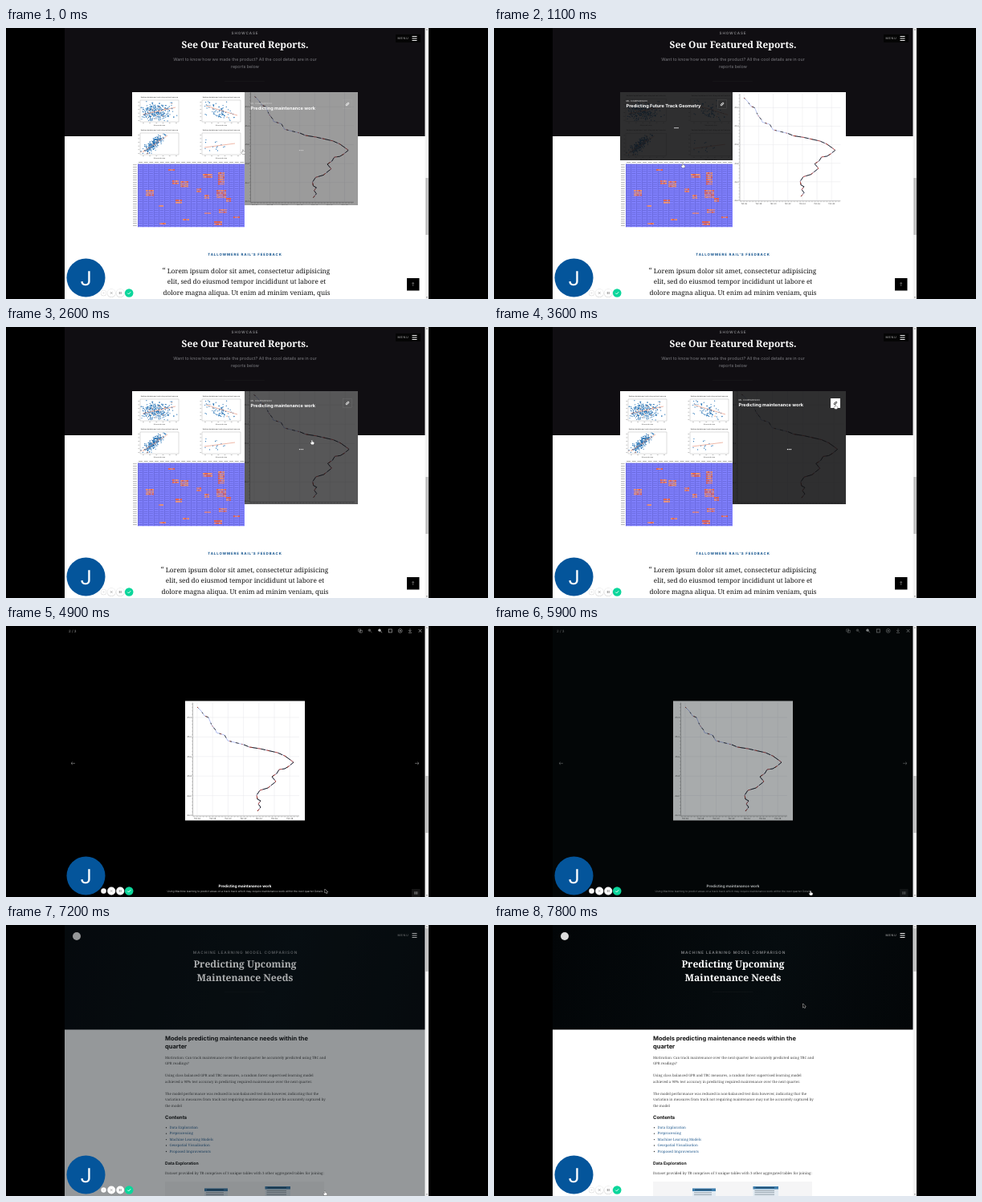
Write an HTML page with a canvas that moves like this. It is 600 px wide and 338 px high and loops after 8 s.

```html
<!DOCTYPE html>
<html lang="en">
<head>
<meta charset="utf-8">
<title>Report showcase</title>
<style>
html, body { margin: 0; width: 100%; height: 100%; overflow: hidden; background: #000; }
canvas { display: block; width: 600px; height: 338px; }
</style>
</head>
<body>
<canvas id="stage" width="600" height="338"></canvas>
<script>
const ctx = document.getElementById('stage').getContext('2d');
const LOOP = 8000;
const SANS = 'Inter, sans-serif', SERIF = '"Noto Serif", serif';

// Smooth 0..1 progress between two times
const ramp = (t, a, b) => {
  const p = Math.min(1, Math.max(0, (t - a) / (b - a)));
  return p * p * (3 - 2 * p);
};
const seeded = s => () => (s = (s * 16807) % 2147483647) / 2147483647;

function rect(x, y, w, h, color) {
  ctx.fillStyle = color;
  ctx.fillRect(x, y, w, h);
}
function disc(x, y, r, color) {
  ctx.fillStyle = color;
  ctx.beginPath();
  ctx.arc(x, y, r, 0, 7);
  ctx.fill();
}
function line(points, color, width = 0.6, dash = [], offset = 0) {
  ctx.strokeStyle = color;
  ctx.lineWidth = width;
  ctx.setLineDash(dash);
  ctx.lineDashOffset = offset;
  ctx.beginPath();
  points.forEach(([x, y]) => ctx.lineTo(x, y));
  ctx.stroke();
  ctx.setLineDash([]);
}
function box(x, y, w, h, color, width = 0.5) {
  ctx.strokeStyle = color;
  ctx.lineWidth = width;
  ctx.strokeRect(x, y, w, h);
}
// y is the middle of the capital letters
function text(s, x, y, size, color, { font = SANS, weight = 400, align = 'left', gap = 0 } = {}) {
  ctx.font = `${weight} ${size}px ${font}`;
  ctx.letterSpacing = gap + 'px';
  ctx.textRendering = 'geometricPrecision';
  ctx.textAlign = align;
  ctx.fillStyle = color;
  ctx.fillText(s, x, y + size * 0.36);
}
function faded(alpha, draw) {
  ctx.save();
  ctx.globalAlpha *= alpha;
  draw();
  ctx.restore();
}

const TRACK = [[15, 7.5], [20, 12.5], [24, 18.5], [29, 20.5], [33, 30], [38, 36.5], [39, 39.5],
  [49, 42.5], [53, 49.5], [73, 54.5], [80, 57.5], [93, 59.5], [115, 64.5], [124, 68.5],
  [131, 73.5], [135, 76.5], [129, 81.5], [124, 84.5], [117, 85.5], [114, 90.5], [108, 94.5],
  [113, 100.5], [103, 108.5], [93, 111.5], [89, 117.5], [90, 122.5], [94, 124.5], [91, 128.5],
  [94, 132.5], [90, 137.5]];

function trackPlot(x, y, size) {
  ctx.save();
  ctx.translate(x, y);
  ctx.scale(size / 149, size / 149);
  rect(0, 0, 149, 149, '#fff');
  for (let i = 0; i < 7; i++) {
    const gx = 15 + i * 19.2, gy = 20.5 + i * 24.4;
    line([[gx, 2], [gx, 143]], '#e6e6ea', 0.5);
    text((152.36 + i * 0.02).toFixed(2), gx, 147, 2.6, '#555', { align: 'center' });
    if (i > 5) continue;
    line([[9, gy], [142, gy]], '#e6e6ea', 0.5);
    text('-' + (25.2 + i * 0.2).toFixed(1), 8, gy, 2.6, '#555', { align: 'right' });
  }
  line([[9.5, 2], [9.5, 143.5], [142, 143.5]], '#777', 0.5);
  for (let i = 0; i < 34; i++) {
    line([[8, 4 + i * 4.2], [9.5, 4 + i * 4.2]], '#888', 0.4);
    line([[11 + i * 3.9, 143.5], [11 + i * 3.9, 145]], '#888', 0.4);
  }
  line(TRACK, '#93a4ea', 0.7);
  line(TRACK.slice(9), '#222', 1, [6, 3, 9, 4]);
  line(TRACK.slice(9), '#b8402f', 0.9, [4, 7], 4);
  line(TRACK.slice(0, 10), '#333', 0.9, [4, 7, 2, 5], 2);
  line(TRACK.slice(0, 10), '#b8402f', 0.8, [1.5, 14]);
  ctx.restore();
}

function scatterPanel(x, y, count, point, trend, seed) {
  const rnd = seeded(seed), bell = () => (rnd() + rnd() + rnd() - 1.5) * 1.4;
  text('Relationship between track rating and next measure', x + 24, y - 3.5, 1.9, '#222', { align: 'center' });
  text('Measured value', x + 24, y + 31, 1.9, '#444', { align: 'center' });
  box(x, y, 48, 27, '#aaa', 0.4);
  for (let i = 0; i < 6; i++) {
    rect(x - 2.6, y + 2 + i * 4.6, 1.8, 0.7, '#aaa');
    rect(x + 3 + i * 8.2, y + 28, 1.8, 0.7, '#aaa');
  }
  for (let i = 0; i < count; i++) {
    const [px, py] = point(rnd, bell);
    if (px > 1 && px < 47 && py > 1 && py < 26)
      disc(x + px, y + py, 0.6, rnd() < 0.06 ? '#e8835a' : '#1f6fb4');
  }
  line(trend.map(([px, py]) => [x + px, y + py]), '#e58a70', 0.6);
}

function scatterGrid(x, y) {
  rect(x, y, 141, 85, '#fff');
  const cloud = (r, b) => [15 + b() * 10 + r() ** 4 * 24, 15 + b() * 8];
  const fall = (r, b) => { const u = b(); return [21 + u * 11 + b() * 5, 12 + u * 4 + b() * 8]; };
  const climb = (r, b) => { const u = b(); return [17 + u * 8 + b() * 3, 14 - u * 7 + b() * 4]; };
  const sparse = r => [4 + r() * 36, 8 + r() * 16];
  scatterPanel(x + 10, y + 10, 290, cloud, [[3, 18], [44, 9]], 11);
  scatterPanel(x + 87, y + 10, 85, fall, [[5, 7], [44, 19]], 23);
  scatterPanel(x + 10, y + 51, 230, climb, [[3, 24], [34, 3]], 37);
  scatterPanel(x + 87, y + 51, 14, sparse, [[3, 18], [41, 13]], 51);
}

// Hot areas as x, y, width, height
const HOT = [[45, 11, 7, 2], [88, 17, 11, 4], [107, 15, 8, 16], [50, 25, 7, 3], [60, 26, 10, 7],
  [17, 37, 9, 6], [80, 35, 5, 3], [90, 43, 6, 3], [105, 37, 11, 10], [54, 49, 8, 3],
  [117, 47, 6, 3], [33, 56, 6, 2], [108, 61, 9, 4], [90, 65, 7, 2], [126, 70, 8, 2],
  [63, 73, 8, 2], [34, 78, 7, 2], [102, 76, 9, 4]];

function heatmap(x, y) {
  const rnd = seeded(5);
  rect(x, y, 141, 84, '#fff');
  rect(x + 7, y + 4.5, 134, 79, '#8080ff');
  for (const [hx, hy, w, h] of HOT)
    for (let r = 0; r < h; r += 2.7)
      for (let c = 0; c < w; c += 2)
        rect(x + hx + c, y + hy + r, 2, 2, ['#f4694f', '#f99a70', '#d58aa0'][Math.floor(rnd() * 3)]);
  for (let r = 0; r < 29; r++) {
    const ry = y + 5.4 + r * 2.7;
    rect(x + 1, ry, 4.8, 0.7, '#999');
    for (let c = 0; c < 20; c++) rect(x + 8 + c * 6.65, ry, 4.6, 0.7, 'rgba(45,45,120,.35)');
  }
  for (let c = 0; c < 20; c++) {
    rect(x + 8 + c * 6.65, y + 2, 5, 0.8, '#999');
    rect(x + 7 + c * 6.65, y + 4.5, 0.4, 79, 'rgba(40,40,120,.6)');
  }
}

function chain(x, y, color) {
  ctx.save();
  ctx.translate(x, y);
  ctx.rotate(-Math.PI / 4);
  ctx.strokeStyle = color;
  ctx.lineWidth = 0.8;
  for (const dx of [-2.3, -0.3]) {
    ctx.beginPath();
    ctx.roundRect(dx, -0.9, 2.6, 1.8, 0.9);
    ctx.stroke();
  }
  ctx.restore();
}

function card(x, y, w, h, p, label, title, picture, linkHover = 0) {
  const cx = x + w / 2, cy = y + h / 2, zoom = 1 + 0.05 * p;
  ctx.save();
  ctx.beginPath();
  ctx.rect(x, y, w, h);
  ctx.clip();
  ctx.translate(cx, cy);
  ctx.scale(zoom, zoom);
  ctx.translate(-cx, -cy);
  picture(x, y, w);
  ctx.restore();
  if (!p) return;
  faded(p, () => {
    rect(x, y, w, h, 'rgba(17,17,18,.87)');
    for (const dx of [-2, 0, 2]) rect(cx + dx - 0.6, cy + 1.5, 1.2, 1.2, '#fff');
    box(x + w - 18.5, y + 9.5, 11, 11, 'rgba(255,255,255,.15)');
    if (linkHover) faded(linkHover, () => rect(x + w - 19, y + 9, 12, 12, '#fff'));
  });
  const drop = 6 * (1 - p);
  faded(Math.min(1, 2 * p), () => {
    chain(x + w - 13, y + 15, linkHover > 0.5 ? '#222' : '#fff');
    text(label, x + 7.5, y + 11.3 + drop, 2.8, '#ccc', { weight: 500, gap: 0.2 });
    text(title, x + 7.5, y + 17 + drop, 5.65, '#fff', { weight: 700 });
  });
}

function menu() {
  text('MENU', 487.5, 12.7, 3.6, '#bbb', { gap: 0.8 });
  for (let i = 0; i < 3; i++) rect(505.5, 10 + i * 2.5, 6, 1, '#eee');
}

function showcase(t) {
  rect(73, 0, 449, 338, '#fff');
  rect(73, 0, 449, 135, '#100e12');
  text('SHOWCASE', 297.5, 6, 4.6, '#858588', { weight: 600, align: 'center', gap: 0.9 });
  text('See Our Featured Reports.', 297.5, 21, 11.9, '#fff', { font: SERIF, weight: 700, align: 'center' });
  ['Want to know how we made the product? All the cool details are in our', 'reports below'].forEach(
    (s, i) => text(s, 297.5, 39.3 + i * 9, 5.38, '#7c7c80', { align: 'center' }));
  rect(272, 66, 50, 0.5, '#1b1a1d');
  rect(485, 8, 31, 10, '#050505');
  menu();

  const top = ramp(t, 250, 600) * (1 - ramp(t, 1100, 1450));
  const bottom = ramp(t, 1150, 1500) * (1 - ramp(t, 2250, 2600));
  const right = 0.48 * (1 - ramp(t, 0, 300)) + ramp(t, 2350, 2700);
  card(157, 80, 140, 85, top, 'ML COMPARISON', 'Predicting Future Track Geometry', scatterGrid);
  card(157, 165, 140, 83.5, bottom, 'DATA EXPLORATION', 'Maintenance Distribution', heatmap);
  card(297, 80, 141, 141, right, 'ML COMPARISON', 'Predicting maintenance work', trackPlot, ramp(t, 3250, 3450));

  text("TALLOWMERE RAIL'S FEEDBACK", 297.5, 282, 4.4, '#0d4f8b', { weight: 700, align: 'center', gap: 0.85 });
  const shift = 2 * (1 - ramp(t, 0, 500));
  text('“', 192.5 + shift, 302, 9, '#222', { font: SERIF, weight: 500 });
  ['Lorem ipsum dolor sit amet, consectetur adipisicing',
    'elit, sed do eiusmod tempor incididunt ut labore et',
    'dolore magna aliqua. Ut enim ad minim veniam, quis'].forEach((s, i) =>
    text(s, (i ? 297.5 : 300) + shift, 302.8 + i * 13.5, 8.2, '#111',
      { font: SERIF, weight: 500, align: 'center' }));
  rect(499, 312, 15.5, 15.5, '#000');
  line([[506.7, 322], [506.7, 317.5]], '#999');
  line([[505.4, 319], [506.7, 317.5], [508, 319]], '#999');
}

function ring(x, y, r) {
  ctx.strokeStyle = '#999';
  ctx.lineWidth = 0.7;
  ctx.beginPath();
  ctx.arc(x, y, r, 0, 7);
  ctx.stroke();
}

function lightbox(t) {
  faded(ramp(t, 3720, 4000), () => rect(73, 0, 449, 338, '#000'));
  faded(ramp(t, 4050, 4450), () => trackPlot(223, 93.5, 149));
  faded(ramp(t, 3850, 4150), () => {
    const gray = '#999';
    text('2 / 3', 78, 6.3, 4.4, gray);
    box(438.8, 4, 3, 3, gray);
    box(440.2, 5.2, 3, 3, gray);
    for (const x of [452.5, 465]) {
      const c = x < 460 ? '#555' : '#bbb';
      disc(x, 5.3, 1.7, c);
      line([[x + 1, 6.3], [x + 2.8, 8.2]], c, 0.9);
    }
    box(476.3, 4, 4, 4, gray, 0.8);
    ring(490.7, 6, 2.4);
    disc(490.7, 6, 0.9, gray);
    line([[503, 3.3], [503, 7], [501.5, 5.6], [503, 7], [504.5, 5.6]], gray, 0.7);
    line([[501, 8.5], [505, 8.5]], gray, 0.7);
    line([[513.7, 4], [517.3, 8]], '#bbb', 0.7);
    line([[517.3, 4], [513.7, 8]], '#bbb', 0.7);
    for (const [x, d] of [[81, 1], [514, -1]]) {
      line([[x, 171.3], [x + 5 * d, 171.3]], gray);
      line([[x + 1.8 * d, 169.6], [x, 171.3], [x + 1.8 * d, 173]], gray);
    }
    rect(505, 328, 10.5, 10, '#161616');
    for (let i = 0; i < 6; i++) rect(508.2 + (i % 3) * 1.6, 331.5 + (i > 2) * 1.8, 1.1, 1.2, gray);
    text('Predicting maintanance work', 297.5, 324, 4.63, '#fff', { weight: 700, align: 'center' });
    text('Using Machine learning to predict areas on a track track which may require maintenance work within the next quarter Details',
      297.5, 331, 3.3, '#bbb', { align: 'center' });
  });
  // Leaving for the report page
  faded(ramp(t, 5700, 6200), () => rect(73, 0, 449, 338, '#0b1216'));
}

const PARAGRAPHS = [
  [165, 'Motivation: Can track maintenance over the next quarter be accurately predicted using TRC and'],
  [172.5, 'GPR readings?'],
  [187.5, 'Using class balanced GPR and TRC measures, a random forest supervised learning model'],
  [195, 'achieved a 90% test accuracy in predicting required maintenance over the next quarter.'],
  [210, 'The model performance was reduced in non-balanced test data however, indicating that the'],
  [217.5, 'variation in measures from track not requiring maintenance may not be accurately captured by'],
  [225, 'the model'],
  [309.5, 'Dataset provided by TR comprises of 3 unique tables with 3 other aggregated tables for joining:']];
const CONTENTS = ['Data Exploration', 'Preprocessing', 'Machine Learning Models', 'Geospatial Visualisation', 'Proposed Improvements'];

function table(x, y, w) {
  rect(x, y, w, 12, '#e3ebf2');
  rect(x, y, w, 3.5, '#3f7fae');
  rect(x + 3, y + 1.3, w - 8, 0.9, '#16364f');
  for (let i = 0; i < 3; i++) rect(x + 2, y + 5 + i * 2.4, w - 7, 0.8, '#7c8b98');
}

function report(t) {
  const p = Math.min(1, Math.max(0, (t - 6700) / 800));
  const bold = { weight: 700 }, serif = { font: SERIF };
  rect(73, 0, 449, 338, '#fff');
  const night = ctx.createLinearGradient(73, 0, 522, 130);
  night.addColorStop(0, '#020507');
  night.addColorStop(0.6, '#060c0f');
  night.addColorStop(1, '#030608');
  rect(73, 0, 449, 130.5, night);
  text('Models predicting maintenance needs within the', 198, 140.8, 7.5, '#111', bold);
  text('quarter', 198, 151, 7.5, '#111', bold);
  for (const [y, s] of PARAGRAPHS) text(s, 198, y, 4.38, '#444', serif);
  text('Contents', 198, 239.7, 6.1, '#111', bold);
  CONTENTS.forEach((s, i) => {
    disc(199.5, 252.7 + i * 7.45, 0.7, '#333');
    text(s, 203.5, 252.4 + i * 7.45, 4.4, '#255d90', serif);
  });
  text('Data Exploration', 198, 297, 5.2, '#111', bold);
  rect(198, 320, 198, 18, '#f5f5f6');
  table(247, 328.5, 29);
  table(322.5, 326, 31.5);

  faded(1 - Math.pow(p, 1.2), () => rect(73, 0, 449, 338, '#0b1216'));
  faded(Math.pow(p, 0.85), () => {
    disc(88, 14, 5, '#ddd');
    menu();
    text('MACHINE LEARNING MODEL COMPARISON', 298, 34, 4.8, '#85878a', { weight: 600, align: 'center', gap: 0.9 });
    ['Predicting Upcoming', 'Maintenance Needs'].forEach((s, i) =>
      text(s, 297.5, 49 + i * 16.7, 12.1, '#fff', { font: SERIF, weight: 700, align: 'center' }));
    rect(272, 83.5, 50, 0.5, '#14191b');
  });
}

function scrollbar(y, h) {
  rect(521.5, 0, 4.5, 338, '#f4f4f4');
  rect(522.4, y, 3.2, h, '#bdbdbd');
  rect(523.3, 1.5, 1.4, 1.2, '#777');
  rect(523.3, 335.3, 1.4, 1.2, '#777');
}

function recorder() {
  disc(99.5, 311.5, 24, '#04559b');
  text('J', 99.6, 312, 25, '#fff', { font: 'Roboto, sans-serif', align: 'center' });
  for (const [x, r] of [[121.5, 3.2], [131.2, 5], [142.2, 5]]) {
    disc(x, 330.7, r + 0.4, 'rgba(120,120,120,.3)');
    disc(x, 330.5, r, '#fff');
  }
  rect(120.6, 330.2, 1.8, 0.6, '#bbb');
  line([[129.9, 329.2], [132.5, 331.8]], '#888');
  line([[132.5, 329.2], [129.9, 331.8]], '#888');
  rect(140.8, 329, 0.9, 3, '#888');
  rect(142.7, 329, 0.9, 3, '#888');
  disc(153.2, 330.5, 5.3, '#0bd69b');
  line([[151.2, 330.6], [152.6, 332], [155.2, 329.2]], '#fff', 0.9);
}

// Time, x, y
const MOVES = [[0, 295, 152], [600, 232, 140], [1000, 235, 168], [1100, 235, 169], [1600, 232, 189],
  [2150, 232, 189], [2650, 385, 140], [3400, 425, 97], [3800, 425, 97], [4500, 396, 102],
  [4900, 397, 328], [5200, 397, 328], [5500, 393, 330], [5700, 393, 330], [6300, 397, 332],
  [7500, 397, 332], [7800, 384.5, 98], [LOOP, 384.5, 98]];

function pointer(t) {
  const i = MOVES.findIndex(m => m[0] > t);
  const [ta, xa, ya] = MOVES[i - 1], [tb, xb, yb] = MOVES[i], p = ramp(t, ta, tb);
  const hand = t < 3900 || (t > 5300 && t < 7500);
  const arrow = 'M0 0V5L1.2 4L2 5.7L2.8 5.3L2.1 3.7H3.6Z';
  const palm = 'M-.5 0H.5V2L2.6 2.5V4L2 5.2H-.7L-1.9 3.2L-1.4 2.7L-.5 3.3Z';
  ctx.save();
  ctx.translate(xa + (xb - xa) * p, ya + (yb - ya) * p);
  const shape = new Path2D(hand ? palm : arrow);
  ctx.lineWidth = 0.7;
  ctx.strokeStyle = hand ? '#444' : '#fff';
  ctx.fillStyle = hand ? '#fff' : '#111';
  ctx.stroke(shape);
  ctx.fill(shape);
  ctx.restore();
}

const start = performance.now();
function frame() {
  const t = (performance.now() - start) % LOOP;
  rect(0, 0, 600, 338, '#000');
  if (t < 6300) {
    if (t < 4050) showcase(t);
    if (t > 3720) lightbox(t);
    scrollbar(187, 71);
  } else {
    report(t);
    scrollbar(4, 54);
  }
  recorder();
  pointer(t);
  requestAnimationFrame(frame);
}
frame();
</script>
</body>
</html>
```
